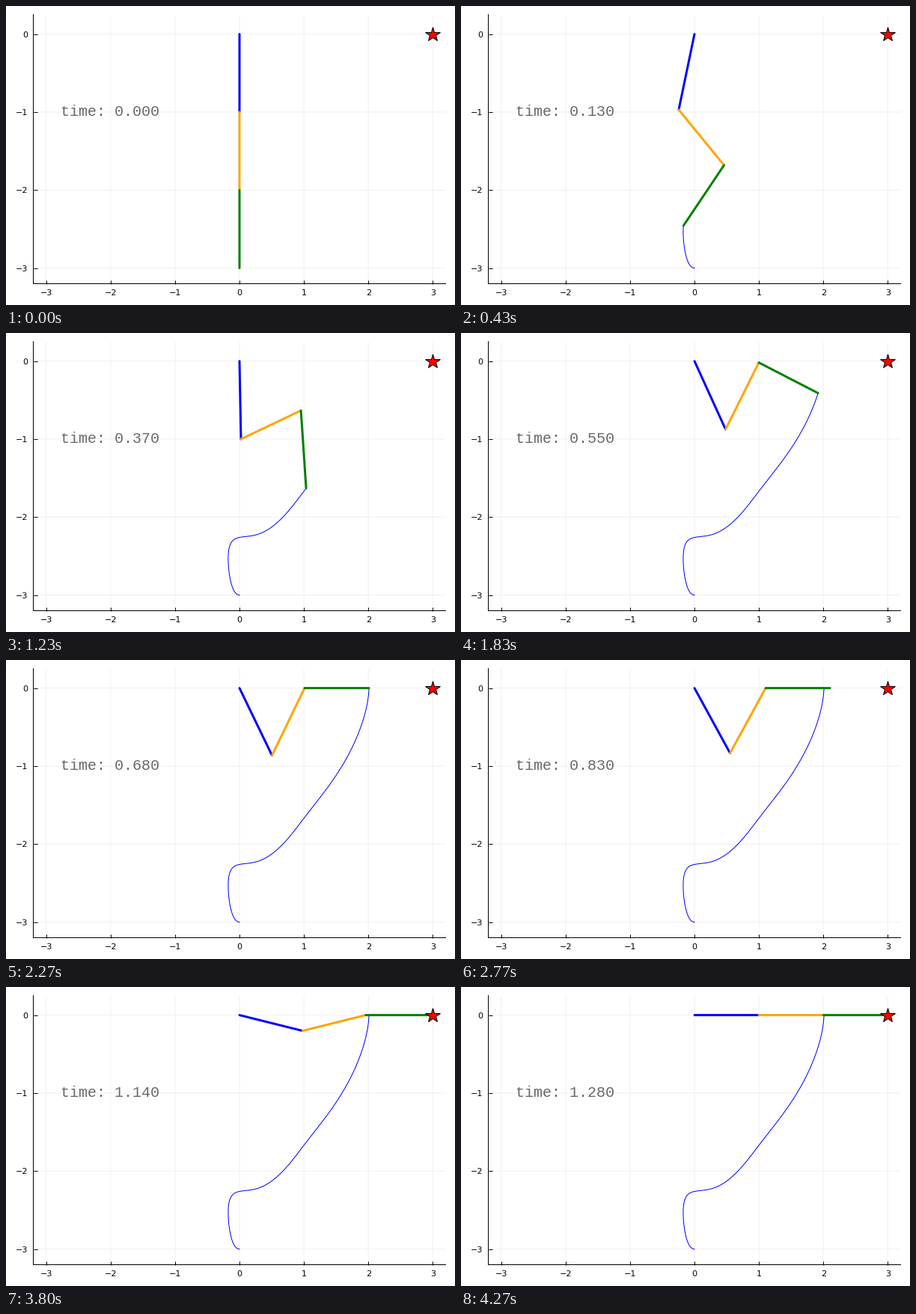
Write a matplotlib script that moves like this. It is 600x400 px and loops after 4310 ms.

```python
import numpy as np
import matplotlib.pyplot as plt
from matplotlib.animation import FuncAnimation

DPI = 100
W, H = 600, 400
PX = 72 / DPI        # one pixel in points
STEPS = 128          # simulation steps of 0.01 s
SUB = 4              # trail samples per step
TICKS = 431          # 10 ms display ticks in one loop

SWING_END = 0.65                      # arm at rest, lower link level
REACH_START, REACH_END = 0.664, 1.269  # tip slides along y = 0
X_START, X_END = 2.01, 3.0


def reach(t):
    """Link angles from straight down while the tip slides outwards."""
    u = np.clip((t - REACH_START) / (REACH_END - REACH_START), 0, 1)
    s = u**4 * (35 - 84 * u + 70 * u**2 - 20 * u**3)
    x = X_START + (X_END - X_START) * s
    a = np.arcsin(min((x - 1) / 2, 1))
    return np.array([a, np.pi - a, np.pi / 2])


# Key poses of the swing-up: hanging, three bends, level
key_t = np.array([0, 0.13, 0.24, 0.37, 0.55, SWING_END])
key_q = np.array([
    [0, 0, 0],
    [-0.247, 0.780, -0.682],
    [-0.230, 1.225, -0.435],
    [0.023, 1.945, 0.081],
    [0.504, 2.600, 1.168],
    reach(0),
])


def spline_slopes(t, q):
    """Slopes of the cubic spline that starts and ends at rest."""
    h = np.diff(t)
    d = np.diff(q, axis=0) / h[:, None]
    a, b = np.eye(len(t)), np.zeros_like(q)
    for i in range(1, len(t) - 1):
        a[i, i - 1:i + 2] = h[i], 2 * (h[i - 1] + h[i]), h[i - 1]
        b[i] = 3 * (h[i] * d[i - 1] + h[i - 1] * d[i])
    return np.linalg.solve(a, b)


key_v = spline_slopes(key_t, key_q)


def swing(t):
    i = np.searchsorted(key_t, t, side="right") - 1
    h = key_t[i + 1] - key_t[i]
    u = (t - key_t[i]) / h
    s = u * u * (3 - 2 * u)
    return ((1 - s) * key_q[i] + s * key_q[i + 1]
            + h * u * (1 - u) * ((1 - u) * key_v[i] - u * key_v[i + 1]))


def joints(t):
    q = swing(t) if t < SWING_END else reach(t)
    pts = np.zeros((4, 2))
    pts[1:, 0] = np.cumsum(np.sin(q))
    pts[1:, 1] = np.cumsum(-np.cos(q))
    return pts


poses = np.array([joints(i * 0.01 / SUB) for i in range(STEPS * SUB + 1)])

plt.rcParams.update({"font.family": "DejaVu Sans", "path.snap": False})
fig = plt.figure(figsize=(W / DPI, H / DPI), dpi=DPI, facecolor="white")
ax = fig.add_axes([36.5 / W, 28.5 / H, 551 / W, 360 / H])
ax.set(xlim=(-3.2, 3.2), ylim=(-3.2, 0.25),
       xticks=range(-3, 4), yticks=range(-3, 1))
ax.set_axisbelow(True)
ax.grid(color="black", alpha=0.06, lw=PX)
ax.spines[["top", "right"]].set_visible(False)
ax.spines[["left", "bottom"]].set_linewidth(PX)
ax.tick_params(direction="in", length=5 * PX, width=PX, labelsize=8, pad=5.2)

trail, = ax.plot([], [], color="blue", lw=PX, zorder=2)
links = [
    ax.plot([], [], color=c, lw=3 * PX, solid_capstyle="round", zorder=3 + i)[0]
    for i, c in enumerate(["blue", "orange", "green"])
]
ax.plot([3], [0], "*", ms=20 * PX, mfc="red", mec="black", mew=PX, zorder=7)
clock = ax.text(-2.01, -1, "", family="Liberation Mono", size=14.4,
                color="#686868", ha="center", va="center", zorder=8)


def draw(n):
    step = min((6 * n + 3) // 20, STEPS)
    k = step * SUB
    for i, link in enumerate(links):
        link.set_data(*poses[k, i:i + 2].T)
    trail.set_data(*poses[:k + 1, 3].T)
    clock.set_text(f"time: {step / 100:.3f}")
    return [trail, *links, clock]


anim = FuncAnimation(fig, draw, frames=TICKS, interval=10,
                     repeat=True, repeat_delay=0, blit=False)
plt.show()
```
